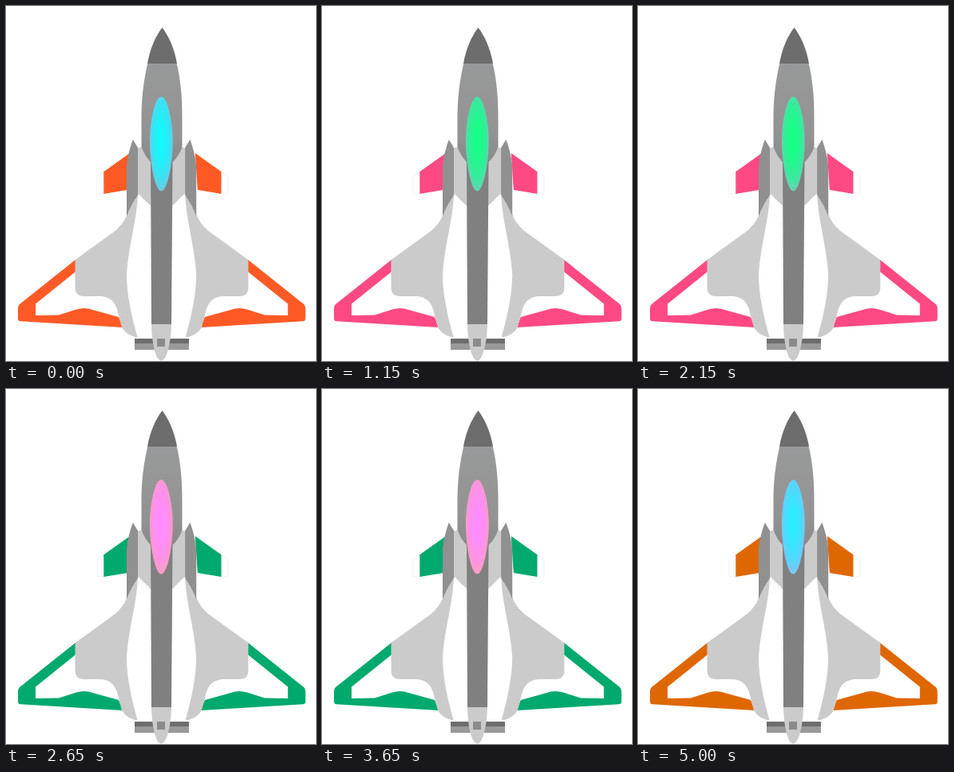
Recreate the animation shown at these times as an HTML page with a canvas. Size 388 by 444 pixels, loop 5050 ms.

```html
<!DOCTYPE html>
<html lang="en">
<head>
<meta charset="utf-8">
<title>Jet</title>
<style>
  html, body { margin: 0; width: 100%; height: 100%; overflow: hidden; background: #fff; }
  canvas { display: block; }
</style>
</head>
<body>
<canvas id="stage" width="388" height="444"></canvas>
<script>
const ctx = document.getElementById("stage").getContext("2d");
const STEP = 50, STEPS = 101, TURN = -18;
const BODY_AXIS = 194.6, WING_AXIS = 194.9, FORE_AXIS = 195.9;

const PAINT = [255, 90, 38];
const GLASS = [18, 248, 252];
const GLASS_RIM = [60, 225, 242];
const GLASS_EDGE = [117, 201, 228];
const LIGHT = "#cbcbcb", NACELLE = "#909090", STRIPE = "#808080";

// Shapes on the left half are mirrored to the right.
const foreplane = new Path2D("M155 184 L122 207.5 V235 L152 230 Z");
const foreTip = new Path2D("M122 208 L114 213 V234.5 L122 235 Z");
const nacelle = new Path2D("M158.8 167 L165.5 178 V236 Q156 249 151 263 V200 Q152.5 184 158.8 167 Z");
const intake = new Path2D("M165 178 L170 176 Q173 187 181.5 196 V250 L165 234 Z");
const wing = new Path2D("M88 316.5 L17 373 Q15 375 15 378 V391 Q15 394 18 394.2 L146 402 L141 389 " +
  "L103 378.5 Q96 377 88 379.5 L66 386.5 L37 387 V372.5 L88 331.5 Z");
const wingRoot = new Path2D("M165 235 Q156 247 151 262 Q147 272 137 281 L86.5 317.5 V352 Q86.5 363 98 363 H119 " +
  "Q134 364 139 379 L145 402 Q150 411 163 414.5 L183 400 V250 Z");
const hull = new Path2D("M165 235 C164 268 153.5 298 151 335 C151 360 157 388 165 415.5 H187 V250 L181.5 250 Z");

const fuselage = new Path2D("M177.5 71 C172 94 169.5 116 169.5 140 V176 Q173 187 181.5 196 H208 " +
  "Q217 187 220.5 176 V140 C220.5 116 219 94 213.5 71 Z");
const nose = new Path2D("M195.5 27 C187 38 180 54 177 72 H214 C211 54 204 38 195.5 27 Z");
const stripe = new Path2D("M181 194 H208.5 L207 399 H182 Z");
const canopy = new Path2D("M194.3 113.5 C202 113.5 208.7 143 208.7 169 C208.7 196 202 231.5 194.3 231.5 " +
  "C186.5 231.5 180 196 180 169 C180 143 186.5 113.5 194.3 113.5 Z");
const tail = new Path2D("M182 398 H207 C206.5 421 201 443.5 194.5 443.5 C187 443.5 182.5 421 182 398 Z");

const bodyShade = ctx.createLinearGradient(0, 72, 0, 230);
bodyShade.addColorStop(0, "#98999a");
bodyShade.addColorStop(0.55, "#939393");
bodyShade.addColorStop(1, STRIPE);

// Luminance-preserving hue rotation.
function rotateHue([r, g, b], degrees) {
  const a = degrees * Math.PI / 180, c = Math.cos(a), s = Math.sin(a);
  const l = 0.213 * r + 0.715 * g + 0.072 * b;
  const out = [
    l + c * (r - l) + s * (-0.213 * r - 0.715 * g + 0.928 * b),
    l + c * (g - l) + s * (0.143 * r + 0.140 * g - 0.283 * b),
    l + c * (b - l) + s * (-0.787 * r + 0.715 * g + 0.072 * b)
  ];
  return `rgb(${out.map(v => Math.round(Math.min(255, Math.max(0, v)))).join(",")})`;
}

function fill(path, color) {
  ctx.fillStyle = color;
  ctx.fill(path);
}

function bothSides(axis, draw) {
  draw();
  ctx.save();
  ctx.transform(-1, 0, 0, 1, axis * 2, 0);
  draw();
  ctx.restore();
}

function glassShade(angle) {
  const shade = ctx.createRadialGradient(0, 0, 0, 0, 0, 1);
  shade.addColorStop(0, rotateHue(GLASS, angle));
  shade.addColorStop(0.25, rotateHue(GLASS, angle));
  shade.addColorStop(0.75, rotateHue(GLASS_RIM, angle));
  shade.addColorStop(1, rotateHue(GLASS_EDGE, angle));
  return shade;
}

function drawCanopy(angle) {
  ctx.save();
  ctx.clip(canopy);
  ctx.translate(194.3, 168);
  ctx.scale(15, 64);
  ctx.fillStyle = glassShade(angle);
  ctx.fillRect(-1, -1, 2, 2);
  ctx.restore();
}

function draw(angle) {
  const paint = rotateHue(PAINT, angle);
  ctx.fillStyle = "#fff";
  ctx.fillRect(0, 0, 388, 444);

  bothSides(FORE_AXIS, () => {
    fill(foreplane, paint);
    ctx.strokeStyle = "#ececec";
    ctx.lineWidth = 0.8;
    ctx.stroke(foreTip);
  });
  bothSides(WING_AXIS, () => {
    fill(wing, paint);
    fill(wingRoot, LIGHT);
  });
  bothSides(BODY_AXIS, () => {
    fill(nacelle, NACELLE);
    fill(hull, "#fff");
    fill(intake, LIGHT);
  });

  ctx.fillStyle = "#999";
  ctx.fillRect(161, 416, 68, 14);
  ctx.fillStyle = "#6d6d6d";
  ctx.fillRect(161, 416, 68, 6);

  fill(stripe, STRIPE);
  fill(fuselage, bodyShade);
  fill(nose, "#6d6d6d");
  fill(tail, LIGHT);
  ctx.fillStyle = "#8b8b8b";
  ctx.fillRect(189, 416, 10, 10);
  drawCanopy(angle);
}

function tick() {
  const n = Math.floor(performance.now() / STEP) % STEPS;
  draw(n ? TURN * (n - 1) : 0);
  requestAnimationFrame(tick);
}
tick();
</script>
</body>
</html>
```
